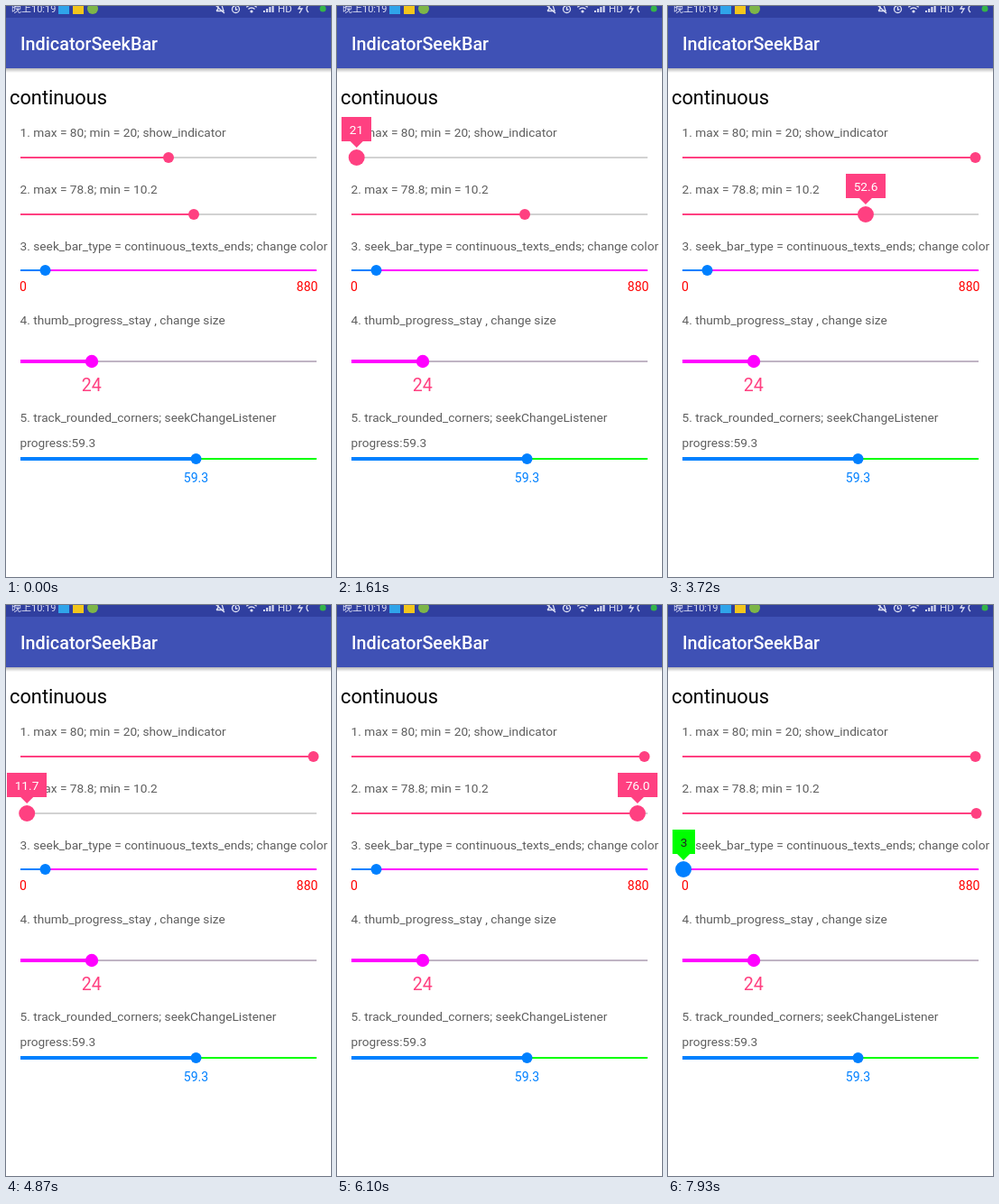
Animation of 360x633 px, one loop 8000 ms. Source, as an HTML page with a canvas:

```html
<!DOCTYPE html>
<html lang="en">
<head>
<meta charset="utf-8">
<title>Seek bars</title>
<style>
  html, body { margin: 0; width: 100%; height: 100%; overflow: hidden; background: #fff; }
  canvas { display: block; width: 360px; height: 633px; }
</style>
</head>
<body>
<canvas id="stage"></canvas>
<script>
const W = 360, H = 633, LOOP = 8000;
const LEFT = 16, RIGHT = 344;
const TICK = 95.4, PHASE = 742;
const PINK = '#ff4081', BLUE = '#0080ff', MAGENTA = '#ff00ff', GREEN = '#00ff00';
const GREY = '#d2d2d2', LABEL = '#5e5e5e', PALE = '#dfe2f4';
const BODY = 13.7;

const canvas = document.getElementById('stage');
const ratio = window.devicePixelRatio || 1;
canvas.width = W * ratio;
canvas.height = H * ratio;
const ctx = canvas.getContext('2d');

const pinkLook = { fill: PINK, track: GREY, bubble: PINK, ink: '#fff' };
const blueLook = { fill: BLUE, track: MAGENTA, bubble: GREEN, ink: '#222' };

// Each path lists the turning points of the finger as [time, x]
const sliders = [
  {
    label: '1. max = 80; min = 20; show_indicator',
    min: 20, max: 80, digits: 0, look: pinkLook, drag: PHASE, release: 3220,
    path: [[400, 180], [440, 177], [PHASE, 177], [1550, 19.5], [2370, 262], [3170, 340.5]]
  },
  {
    label: '2. max = 78.8; min = 10.2',
    min: 10.2, max: 78.8, digits: 1, look: pinkLook, drag: 3590, release: 6370,
    path: [[3490, 208], [3690, 219], [4680, 23.2], [4870, 23.2], [5630, 258], [6250, 341.5]]
  },
  {
    label: '3. seek_bar_type = continuous_texts_ends; change color',
    min: 0, max: 880, digits: 0, look: blueLook, drag: 6650, release: LOOP,
    path: [[6530, 43.5], [6960, 329], [7780, 17.1]]
  }
];
sliders.forEach((s, i) => {
  const y = 168 + i * 62.6;
  s.y = Math.round(y);
  s.top = Math.round(y - 44.6);
  s.baseline = Math.round(y - 22.6);
  s.press = s.path[0][0];
});

// Monotone cubic through the path points
function positionAt(path, t) {
  const last = path.length - 1;
  if (t <= path[0][0]) return path[0][1];
  if (t >= path[last][0]) return path[last][1];
  const i = path.findIndex(p => p[0] > t) - 1;
  const rate = k => (path[k + 1][1] - path[k][1]) / (path[k + 1][0] - path[k][0]);
  const slope = k => {
    if (k === 0 || k === last) return 0;
    const a = rate(k - 1), b = rate(k);
    return a * b <= 0 ? 0 : 2 * a * b / (a + b);
  };
  const [t0, x0] = path[i], [t1, x1] = path[i + 1];
  const d = t1 - t0, u = (t - t0) / d, u2 = u * u, u3 = u2 * u;
  return x0 * (2 * u3 - 3 * u2 + 1) + x1 * (3 * u2 - 2 * u3) +
    d * (slope(i) * (u3 - 2 * u2 + u) + slope(i + 1) * (u3 - u2));
}

function text(str, x, y, { size = BODY, color = LABEL, align = 'left', weight = 400 } = {}) {
  ctx.font = `${weight} ${size}px Roboto, "Noto Sans CJK SC", sans-serif`;
  ctx.fillStyle = color;
  ctx.textAlign = align;
  ctx.fillText(str, x, y);
}

function rect(x, y, w, h, color) {
  ctx.fillStyle = color;
  ctx.fillRect(x, y, w, h);
}

function dot(x, y, r, color) {
  ctx.fillStyle = color;
  ctx.beginPath();
  ctx.arc(x, y, r, 0, Math.PI * 2);
  ctx.fill();
}

function stroke(build) {
  ctx.strokeStyle = PALE;
  ctx.lineWidth = 1.3;
  ctx.beginPath();
  build();
  ctx.stroke();
}

const line = points => stroke(() => points.forEach(([x, y]) => ctx.lineTo(x, y)));
const arc = (x, y, r, from, to) => stroke(() => ctx.arc(x, y, r, from * Math.PI, to * Math.PI));

function drawBar(x, y, { fill, track }, radius = 6, thick = 2) {
  rect(x, y - 1, RIGHT - x, 2, track);
  rect(LEFT, y - thick / 2, x - LEFT, thick, fill);
  dot(x, y, radius, fill);
}

function drawStatusBar() {
  rect(0, 0, W, 13, '#303f9f');
  text('晚上10:19', 6, 7, { size: 11, color: PALE });
  rect(58, -3, 12, 12, '#2fa4ea');
  rect(74, -3, 12, 12, '#f3c61c');
  dot(96, 3, 6, '#7db648');

  // Muted bell, alarm, wifi, signal
  line([[233, 5.5], [235, 3], [235, -1], [239, -1], [241, 5.5], [233, 5.5]]);
  line([[232, -1], [242, 8]]);
  arc(254.5, 3.5, 4, 0, 2);
  line([[254.5, 1], [254.5, 4], [256.5, 4]]);
  for (const r of [8, 5]) arc(272, 7, r, 1.25, 1.75);
  dot(272, 6, 1.6, PALE);
  for (let i = 0; i < 4; i++) rect(285 + i * 3.2, 5 - i * 2, 2, 2 + i * 2, PALE);

  text('HD', 301, 7, { size: 11.5, color: PALE });
  line([[327, -2], [324, 3], [328, 3], [325, 8]]);
  arc(338, 3, 5, 0.7, 1.3);
  dot(351, 3, 3.5, '#35b44a');
}

function drawHeader() {
  rect(0, 13, W, 56, '#3f51b5');
  const shade = ctx.createLinearGradient(0, 69, 0, 74);
  shade.addColorStop(0, 'rgba(0,0,0,.28)');
  shade.addColorStop(1, 'rgba(0,0,0,0)');
  rect(0, 69, W, 5, shade);
  drawStatusBar();
  text('IndicatorSeekBar', 16, 49, { size: 19.8, color: '#fff', weight: 500 });
}

function drawPage() {
  rect(0, 0, W, H, '#fff');
  drawHeader();
  text('continuous', 4, 109, { size: 21.8, color: '#000' });
  for (const s of sliders) text(s.label, LEFT - 0.4, s.baseline);

  text('0', 15, 316, { size: 14, color: '#f00' });
  text('880', 345.4, 316, { size: 14, color: '#f00', align: 'right' });

  text('4. thumb_progress_stay , change size', LEFT - 0.4, 353);
  drawBar(95, 394, { fill: MAGENTA, track: '#c0b4c4' }, 7.2, 4);
  text('24', 94.7, 427, { size: 19.6, color: PINK, align: 'center' });

  text('5. track_rounded_corners; seekChangeListener', LEFT - 0.4, 461);
  text('progress:59.3', LEFT - 0.4, 489);
  drawBar(210.5, 502, { fill: BLUE, track: GREEN }, 6, 4);
  text('59.3', 210.5, 528, { size: 14, color: BLUE, align: 'center' });
}

function drawBubble(s, x, t) {
  // The number trails the finger slightly
  const labelX = positionAt(s.path, t - 20);
  const value = s.min + (labelX - LEFT) / (RIGHT - LEFT) * (s.max - s.min);
  const label = value.toFixed(s.digits);
  ctx.font = `400 ${BODY}px Roboto, sans-serif`;
  const width = Math.round(ctx.measureText(label).width + 17.4);
  const left = Math.min(Math.round(x - width / 2), W - width);
  const tip = s.top + 34;

  ctx.save();
  if (t >= s.release) {
    ctx.translate(x, tip);
    ctx.scale(0.9, 0.9);
    ctx.translate(-x, -tip);
  }
  rect(left, s.top, width, 27, s.look.bubble);
  ctx.beginPath();
  ctx.moveTo(x - 7, tip - 7);
  ctx.lineTo(x + 7, tip - 7);
  ctx.lineTo(x, tip);
  ctx.fill();
  text(label, left + width / 2, s.top + 19, { color: s.look.ink, align: 'center' });
  ctx.restore();
}

function draw(now) {
  // The screen refreshes at a steady, slow rate
  const t = PHASE + Math.floor((now % LOOP - PHASE) / TICK) * TICK;
  ctx.setTransform(ratio, 0, 0, ratio, 0, 0);
  drawPage();
  for (const s of sliders) {
    const x = positionAt(s.path, t);
    const pressed = t >= s.press && t < s.release;
    drawBar(x, s.y, s.look, pressed ? 9 : 6);
    if (t >= s.drag && t < s.release + TICK) drawBubble(s, x, t);
  }
}

function loop() {
  draw(performance.now());
  requestAnimationFrame(loop);
}
loop();
</script>
</body>
</html>
```
